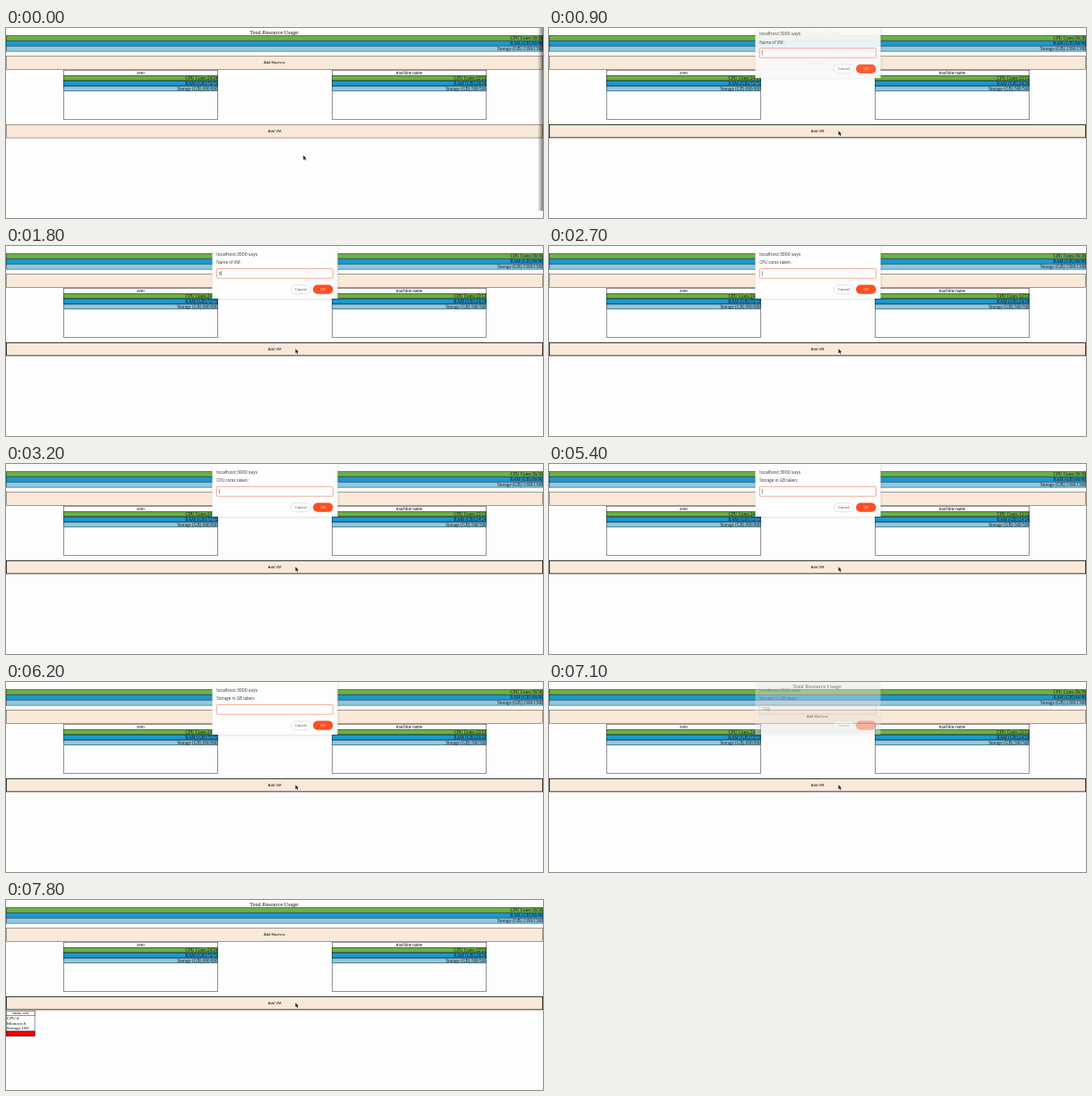
Recreate the animation shown at these times as an HTML page with a canvas. Size 600x213 px, loop 8 s.

```html
<!DOCTYPE html>
<html lang="en">
<head>
<meta charset="utf-8">
<title>Resource planner</title>
<style>
html, body { margin: 0; width: 100%; height: 100%; overflow: hidden; background: #fdfdfd; }
canvas { display: block; width: 600px; height: 213px; }
</style>
</head>
<body>
<canvas id="stage"></canvas>
<script>
const W = 600, H = 213, LOOP = 8000, STEP = 100;
const SERIF = '"Liberation Serif", serif';
const SANS = '"Liberation Sans", sans-serif';
const UI = '"Open Sans", sans-serif';
const PAPER = '#fdfdfd', GREEN = '#6db045', BLUE = '#1c98d6', SKY = '#8bc9e2', BEIGE = '#f8e9d8';
const CLICK = 800, ADDED = 7200;
const OPEN_MS = 160, CLOSE_MS = 150;

// Each prompt replaces the one before it; typeAt is the first key, then one key per step.
const prompts = [
  { label: 'Name of VM:', open: 810, close: 2510, text: 'some vm', typeAt: 1800 },
  { label: 'CPU cores taken:', open: 2510, close: 4210, text: '4', typeAt: 3600 },
  { label: 'RAM in GB taken:', open: 4210, close: 5110, text: '8', typeAt: 4900 },
  { label: 'Storage in GB taken:', open: 5110, close: 7010, text: '100', typeAt: 6600 }
];

const canvas = document.getElementById('stage');
const g = canvas.getContext('2d');
const scale = Math.max(1, window.devicePixelRatio || 1);
canvas.width = W * scale;
canvas.height = H * scale;

const clamp = v => Math.min(1, Math.max(0, v));
const easeOut = p => 1 - Math.pow(1 - p, 3);

function box(x, y, w, h, fill, width = 0.45, line = '#111') {
  g.fillStyle = fill;
  g.fillRect(x, y, w, h);
  g.strokeStyle = line;
  g.lineWidth = width;
  g.strokeRect(x + width / 2, y + width / 2, w - width, h - width);
}

function text(str, x, y, size, font, align = 'left', color = '#111') {
  g.font = size + 'px ' + font;
  g.textAlign = align;
  g.textBaseline = 'alphabetic';
  g.fillStyle = color;
  g.fillText(str, x, y + size * 0.33);
}

function pill(x, y, w, h, fill, line) {
  g.beginPath();
  g.roundRect(x, y, w, h, h / 2);
  g.fillStyle = fill;
  g.fill();
  if (line) {
    g.strokeStyle = line;
    g.lineWidth = 0.5;
    g.stroke();
  }
}

function bars(x, y, w, cpu, ram, disk) {
  const rows = [
    [GREEN, 'CPU Cores:' + cpu],
    [BLUE, 'RAM (GB):' + ram],
    [SKY, 'Storage (GB):' + disk]
  ];
  rows.forEach(([color, label], i) => {
    const top = y + i * 6;
    box(x, top, w, 6, color, 0.4);
    text(label, x + w - 0.4, top + 3.1, 5.1, SERIF, 'right');
  });
}

function machine(x, name, cpu, ram, disk) {
  box(x, 47, 173, 56, PAPER);
  text(name, x + 86.5, 50, 5.1, SERIF, 'center');
  bars(x, 53, 173, cpu, ram, disk);
}

function button(y, h, label, focused) {
  box(0, y, W, h, BEIGE, focused ? 0.85 : 0.45, focused ? '#1a1a1a' : '#333');
  text(label, 300, y + h / 2, 4.15, SANS, 'center');
}

function vmCard() {
  box(0, 124, 32.3, 28.5, PAPER);
  box(0, 124, 32.3, 6, PAPER);
  text('some vm', 16, 126.7, 5, SERIF, 'center');
  ['CPU:4', 'Memory:8', 'Storage:100'].forEach((s, i) =>
    text(s, 0.8, 132.6 + i * 5.6, 5, SERIF));
  box(0, 146.8, 32.3, 5.7, '#f60000');
}

function page(t) {
  g.fillStyle = PAPER;
  g.fillRect(0, 0, W, H);
  text('Total Resource Usage:', 300, 4.7, 6.15, SERIF, 'center');
  bars(0, 8.3, W, '36/36', '96/96', '1300/1300');
  button(31, 15.7, 'Add Machine', false);
  machine(64, 'zero', '24/24', '72/72', '800/800');
  machine(364, 'machine name', '12/12', '24/24', '500/500');
  button(108, 15.3, 'Add VM', t >= CLICK);
  if (t >= ADDED) vmCard();
}

function edgeShadow() {
  const fade = g.createLinearGradient(594, 0, 600, 0);
  fade.addColorStop(0, 'rgba(0,0,0,0)');
  fade.addColorStop(1, 'rgba(0,0,0,.5)');
  g.fillStyle = fade;
  g.fillRect(594, 0, 6, 205);
}

function caretOn(age) {
  return age % 1200 < 800;
}

function dialog(p, t) {
  const shown = easeOut(clamp((t - p.open) / OPEN_MS));
  const left = 1 - clamp((t - p.close) / CLOSE_MS);
  if (shown * left <= 0) return;
  g.save();
  g.globalAlpha = shown * left;
  g.translate(0, -34 * (1 - shown));
  g.shadowColor = 'rgba(0,0,0,.2)';
  g.shadowBlur = 3 * scale;
  g.fillStyle = PAPER;
  g.fillRect(230.5, -40, 140, 99);
  g.shadowColor = 'transparent';

  text('localhost:3000 says', 235.2, 8.9, 5.1, UI, 'left', '#333');
  text(p.label, 235.2, 18.9, 4.55, UI, 'left', '#333');
  g.beginPath();
  g.roundRect(235.3, 25.4, 130, 10.8, 1);
  g.strokeStyle = '#ee8b70';
  g.lineWidth = 0.7;
  g.stroke();

  const keys = t < p.typeAt ? 0 : Math.floor((t - p.typeAt) / STEP) + 1;
  const typed = p.text.slice(0, keys);
  text(typed, 237.8, 30.8, 4.55, UI, 'left', '#222');
  const since = keys ? p.typeAt + (typed.length - 1) * STEP : p.open;
  if (caretOn(t - since)) {
    g.fillStyle = '#333';
    g.fillRect(237.9 + g.measureText(typed).width, 28, 0.5, 5.4);
  }

  pill(318.3, 43.8, 22.4, 9.8, PAPER, '#ccc');
  text('Cancel', 329.5, 48.7, 4.2, UI, 'center', '#444');
  pill(343, 43.6, 22.4, 10.2, '#fb4f24');
  text('OK', 354.2, 48.7, 4.2, UI, 'center', '#ffe3da');
  g.restore();
}

function cursor(t) {
  const p = clamp(t / 700);
  const e = p * p * (3 - 2 * p);
  g.save();
  g.translate(332.2 - 8.8 * e, 142.7 - 27.4 * e);
  g.scale(1.1, 1.1);
  g.beginPath();
  [[0, 0], [0, 4.5], [1, 3.7], [1.8, 5.3], [2.6, 4.9], [1.9, 3.3], [3.2, 3.2]]
    .forEach(([x, y]) => g.lineTo(x, y));
  g.closePath();
  g.lineJoin = 'round';
  g.strokeStyle = '#fff';
  g.lineWidth = 0.7;
  g.stroke();
  g.fillStyle = '#222';
  g.fill();
  g.restore();
}

function draw(now) {
  const t = Math.floor((now % LOOP) / STEP) * STEP;
  g.setTransform(scale, 0, 0, scale, 0, 0);
  page(t);
  if (t < CLICK) edgeShadow();
  prompts.forEach(p => dialog(p, t));
  cursor(t);
}

const start = performance.now();
function tick() {
  draw(performance.now() - start);
  requestAnimationFrame(tick);
}
tick();
</script>
</body>
</html>
```
